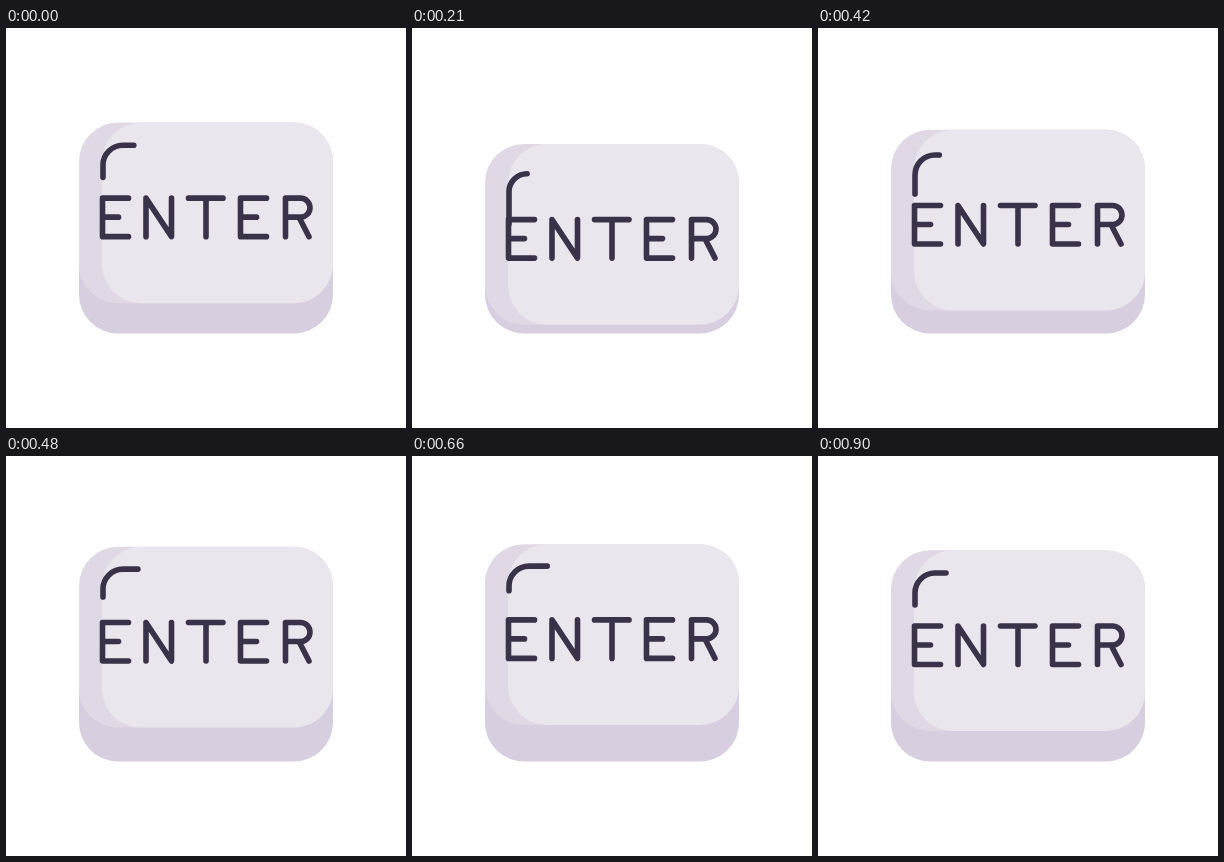
Write an HTML page that moves like this. It is 400x400 px and loops after 2430 ms.

```html
<!DOCTYPE html>
<html lang="en">
<head>
<meta charset="utf-8">
<title>Enter key</title>
<style>
html, body { margin: 0; width: 100%; height: 100%; overflow: hidden; background: #fff; }
svg { display: block; width: 100%; height: 100%; }
.line { fill: none; stroke: #3a3249; stroke-width: 5.6; stroke-linecap: round; stroke-linejoin: round; }
</style>
</head>
<body>
<svg viewBox="0 0 400 400" role="img" aria-label="ENTER">
  <rect x="73" y="190" width="254" height="115.5" rx="39" fill="#d7cfdf"/>
  <g id="cap">
    <rect x="73" y="94.3" width="254" height="180.7" rx="39" fill="#e0d9e5"/>
    <rect x="96" y="94.3" width="231" height="180.7" rx="39" fill="#eae6ed"/>
    <g class="line">
      <path id="e" d="M122.5 170H96.5V208.5H122.5M96.5 189H112.5"/>
      <path d="M140 208.5V170L165.5 208.5V170"/>
      <path d="M182.5 170H217M200 170V208.5"/>
      <use href="#e" x="138"/>
      <path d="M279.5 208.5V170H294.5A9.5 9.5 0 0 1 294.5 189H279.5M293 189L303 208.5"/>
    </g>
  </g>
  <path id="shine" class="line"/>
</svg>
<script>
const LOOP = 2430, DOWN = 23.7, UP = -8.3;
const cap = document.getElementById('cap');
const shine = document.getElementById('shine');
const smooth = x => x * x * (3 - 2 * x);
const mix = (a, b, k) => a + (b - a) * k;

// Vertical offset of the cap: press, rebound past rest, settle
function offset(t) {
  if (t < 300) return DOWN * (1 - (1 - t / 300) ** 2);
  if (t < 540) return mix(DOWN, UP, smooth((t - 300) / 240));
  if (t < 900) return mix(UP, 0, smooth((t - 540) / 360));
  return 0;
}

// The highlight slides along its rounded corner as the cap moves
function shinePath(d) {
  const top = 117 + d * (d > 0 ? 1.33 : 1.12);
  const right = 128 - 1.05 * d + 0.021 * d * d;
  const bottom = 149 + 2.3 * d - 0.006 * d * d;
  const r = Math.min(20, right - 97);
  return `M97 ${bottom}V${top + r}A${r} ${r} 0 0 1 ${97 + r} ${top}H${right}`;
}

const start = performance.now();
function draw(now) {
  const d = offset(Math.max(0, now - start) % LOOP);
  cap.setAttribute('transform', `translate(0 ${d})`);
  shine.setAttribute('d', shinePath(d));
  requestAnimationFrame(draw);
}
draw(start);
</script>
</body>
</html>
```
